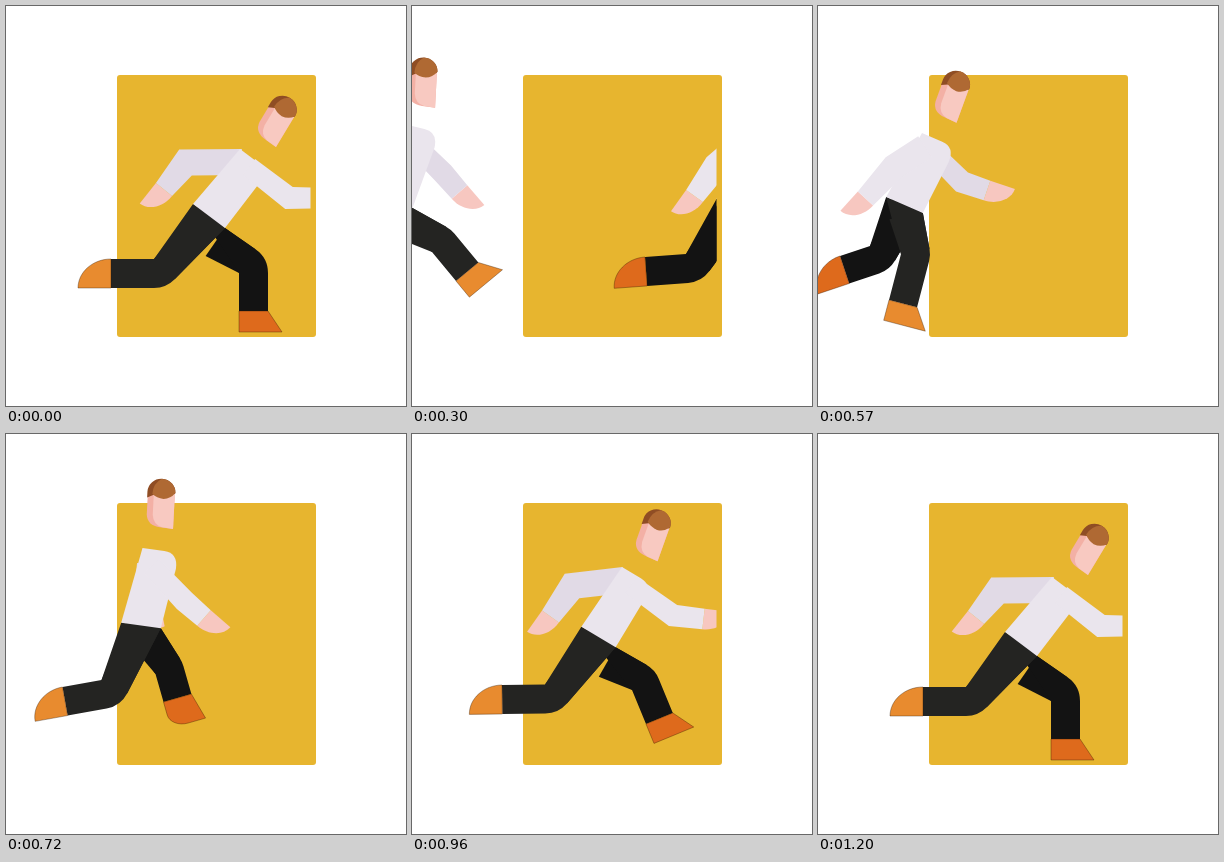
Write an HTML page with a canvas that moves like this. It is 400x400 px and loops after 3.23 s.

```html
<!DOCTYPE html>
<html lang="en">
<head>
<meta charset="utf-8">
<title>Running man</title>
<style>
  html, body { margin: 0; height: 100%; overflow: hidden; background: #fff; }
  canvas { display: block; width: 400px; height: 400px; }
</style>
</head>
<body>
<canvas id="stage" width="400" height="400"></canvas>
<script>
const ctx = document.getElementById('stage').getContext('2d');
const LOOP = 3230, STEP = 30, RUN = 1200, LAP = 343, EDGE = 304.5, LEG = 29;

// body: hip y, hip tilt, neck offset, head tilt; legs: knee, ankle, toe point; arms: elbow, wrist
const poses = {
  contact: {
    body: [210, 37, 31, -67, 31],
    legs: [[-55, 43, -98, 43, 1], [30, 57, 30, 95, 0]],
    arms: [[-54.5, 13.5, -76, 40.5], [49, 49, 81, 49]]
  },
  pass: {
    body: [198, 24.6, 14.5, -73, 16],
    legs: [[-28.5, 39, -54.5, 52, 1], [-6.5, 47, -22.5, 89, 0]],
    arms: [[-26, 26, -42, 61], [23, 60, 36, 87]]
  },
  rise: {
    body: [191.5, 8, 1.5, -77.5, 3],
    legs: [[-39.5, 54.5, -78.5, 61.5, 1], [14.5, 48.5, 22.5, 76.5, 0.5]],
    arms: [[4, 40, 8, 60], [42, 53, 61.5, 70]]
  },
  fly: {
    body: [197.5, 13, 10, -79.5, 3],
    legs: [[-50, 50.5, -91, 53.5, 1], [39, 48.5, 63, 77.5, 0]],
    arms: [[-30, 42, -51.5, 72], [40, 49, 56.5, 68]]
  },
  stance: {
    body: [199, 23.4, 17.5, -72, 20],
    legs: [[-34.5, 41, -64.5, 51, 1], [-3.5, 49, -15.5, 95, 0]],
    arms: [[-28, 34, -56.5, 65.5], [40, 49, 65, 57.5]]
  },
  reach: {
    body: [203, 31, 23.5, -70, 19.5],
    legs: [[-53.5, 47.5, -96.5, 48, 1], [33.5, 53, 47.5, 87, 0]],
    arms: [[-50, 19, -71.5, 49.5], [51, 48.5, 81.5, 52]]
  }
};

// time, hip x, pose, near leg in front
const keys = [
  [0, 203, 'contact', 0], [120, 253.5, 'pass', 0], [250, 304, 'rise', 1],
  [300, 324, 'fly', 1], [430, 376, 'contact', 1], [570, 429.5, 'stance', 1],
  [720, 478, 'rise', 0], [790, 500, 'fly', 0], [960, 529.5, 'reach', 0],
  [1200, 546, 'contact', 0]
].map(([t, x, name, side]) => {
  const { body, legs, arms } = poses[name];
  return { t, v: [x, ...body, ...legs[side], ...legs[1 - side], ...arms[1 - side], ...arms[side]] };
});

const add = (p, q, k = 1) => [p[0] + q[0] * k, p[1] + q[1] * k];
const mix = (p, q, k) => [p[0] + (q[0] - p[0]) * k, p[1] + (q[1] - p[1]) * k];
const unit = (p, q) => {
  const l = Math.hypot(q[0] - p[0], q[1] - p[1]) || 1;
  return [(q[0] - p[0]) / l, (q[1] - p[1]) / l];
};
const clamp = v => Math.max(-1, Math.min(1, v));
const rad = a => a * Math.PI / 180;

function slope(i, c) {
  if (i === keys.length - 1) return 0;
  const a = keys[Math.max(0, i - 1)], b = keys[i + 1];
  return (b.v[c] - a.v[c]) / (b.t - a.t);
}

function sample(t) {
  let i = 0;
  while (i < keys.length - 2 && t >= keys[i + 1].t) i++;
  const a = keys[i], b = keys[i + 1], d = b.t - a.t, s = (t - a.t) / d;
  const h = s * s * (3 - 2 * s);
  return a.v.map((p, c) => p + (b.v[c] - p) * h
    + d * s * (1 - s) * ((1 - s) * slope(i, c) - s * slope(i + 1, c)));
}

function poly(color, ...pts) {
  ctx.beginPath();
  pts.forEach(p => ctx.lineTo(...p));
  ctx.closePath();
  ctx.fillStyle = color;
  ctx.fill();
}

function drawLeg(hip, hipL, hipR, [kx, ky, ax, ay, m], cloth, shoe) {
  const knee = add(hip, [kx, ky]), ankle = add(hip, [ax, ay]);
  const d = unit(knee, ankle), n = [d[1], -d[0]];
  const v = [hipR[0] - knee[0], hipR[1] - knee[1]];
  const from = Math.atan2(n[1], n[0]);
  const to = Math.min(from, Math.atan2(v[1], v[0]) + Math.acos(Math.min(1, LEG / Math.hypot(...v))));
  const cap = add(knee, [Math.cos(to), Math.sin(to)], LEG);
  const e = unit(hipR, cap);

  poly(cloth, hipR, cap, knee, add(hipR, [-e[1], e[0]], 34));
  ctx.beginPath();
  [hipR, hipL, knee, ankle, add(ankle, n, LEG)].forEach(p => ctx.lineTo(...p));
  ctx.arc(...knee, LEG, from, to, true);
  ctx.closePath();
  ctx.fill();

  // the shoe goes from a flat sole to a pointed, rounded toe
  const at = (x, y) => add(add(ankle, n, x), d, y);
  const h = 21 + 12 * m, toe = at(43 - 14 * m, h), heel = at(0, h);
  const p = mix(heel, toe, m), q = mix(heel, ankle, m);
  ctx.beginPath();
  [ankle, at(LEG, 0), toe, p].forEach(c => ctx.lineTo(...c));
  ctx.bezierCurveTo(...mix(p, heel, 0.55), ...mix(q, heel, 0.55), ...q);
  ctx.closePath();
  ctx.fillStyle = shoe;
  ctx.fill();
  ctx.strokeStyle = 'rgba(50,25,0,.6)';
  ctx.lineWidth = 0.6;
  ctx.stroke();
}

function drawArm(neck, [ex, ey, wx, wy], cloth) {
  const k = clamp(ex / 40);
  const sh = add(neck, [5.5 + 3.5 * k, 15.5 + 2.5 * k]);
  const el = add(neck, [ex, ey]), wr = add(neck, [wx, wy]);
  const u = unit(sh, el), d = unit(el, wr);
  const nu = [-u[1], u[0]], nd = [-d[1], d[0]];
  const bend = Math.max(0.4, 1 + nu[0] * nd[0] + nu[1] * nd[1]);
  const miter = add([0, 0], add(nu, nd), 1 / bend);
  const half = 11.5 - 1.5 * k, mid = 12 - k;
  const a = add(wr, nd, 10.3), b = add(wr, nd, -10.3);

  // the fingertips lie on the upper side of the hand
  const tip = (1 - clamp(d[0] * 3)) / 2;
  const blend = (p, q) => mix(p, q, tip);
  const far = c => add(c, d, 26), near = c => add(c, d, 14);
  ctx.beginPath();
  ctx.moveTo(...a);
  ctx.lineTo(...blend(a, far(a)));
  ctx.bezierCurveTo(
    ...blend(near(a), far(mix(a, b, 0.55))),
    ...blend(far(mix(b, a, 0.55)), near(b)),
    ...blend(far(b), b));
  ctx.lineTo(...b);
  ctx.fillStyle = '#f7c7c0';
  ctx.fill();

  poly(cloth, add(sh, nu, half), add(el, miter, mid), a, b,
    add(el, miter, -mid), add(sh, nu, -half));
}

function drawHead(jaw, tilt) {
  const fill = (color, path) => {
    ctx.fillStyle = color;
    ctx.fill(new Path2D(path));
  };
  ctx.save();
  ctx.translate(...jaw);
  ctx.rotate(rad(tilt));
  fill('#f3b0a5', 'M0 0V-36H-27V-13Q-26-2-13-1Z');
  fill('#f8c9c1', 'M0 0V-36H-21V-13Q-20-3-11-1Z');
  fill('#8f4d24', 'M.5-36A14 13.5 0 0 0-27.5-36V-30L-21-33L0-35Z');
  fill('#af6933', 'M.5-36A14 13.5 0 0 0-14-49.3Q-22-45-22.5-34Q-18-30-11-29.5Q-4-30 .5-36Z');
  ctx.restore();
}

function drawMan(pose, shift) {
  const [x, y, tilt, nx, ny, headTilt] = pose;
  const hip = [x + shift, y], neck = add(hip, [nx, ny]);
  const c = Math.cos(rad(tilt)), s = Math.sin(rad(tilt));
  const across = [c, s], down = [-s, c];
  const hipL = add(hip, across, -20), hipR = add(hip, across, 20);

  drawArm(neck, pose.slice(20, 24), '#e1dae6');
  drawLeg(hip, hipL, hipR, pose.slice(11, 16), '#131313', '#de6a1c');
  drawLeg(hip, hipL, hipR, pose.slice(6, 11), '#242422', '#e88b2f');

  const corner = add(neck, across, 36);
  ctx.beginPath();
  ctx.moveTo(...neck);
  ctx.lineTo(...add(neck, across, 22));
  ctx.quadraticCurveTo(...corner, ...add(corner, down, 16));
  ctx.lineTo(...hipR);
  ctx.lineTo(...hipL);
  ctx.closePath();
  ctx.fillStyle = '#eae5ed';
  ctx.fill();

  drawArm(neck, pose.slice(16, 20), '#eae5ed');
  const a = rad(tilt - 40);
  drawHead(add(neck, [Math.cos(a), Math.sin(a)], 36), headTilt);
}

function draw(t) {
  ctx.fillStyle = '#fff';
  ctx.fillRect(0, 0, 400, 400);
  ctx.fillStyle = '#e7b52f';
  ctx.beginPath();
  ctx.roundRect(111, 69, 199, 262, 3);
  ctx.fill();

  // he leaves behind the right edge and comes back from the left
  ctx.save();
  ctx.beginPath();
  ctx.rect(0, 0, EDGE, 400);
  ctx.clip();
  const pose = sample(t);
  drawMan(pose, 0);
  drawMan(pose, -LAP);
  ctx.restore();
}

function tick() {
  const t = performance.now() % LOOP;
  draw(Math.min(RUN, Math.floor(t / STEP) * STEP));
  requestAnimationFrame(tick);
}
tick();
</script>
</body>
</html>
```
